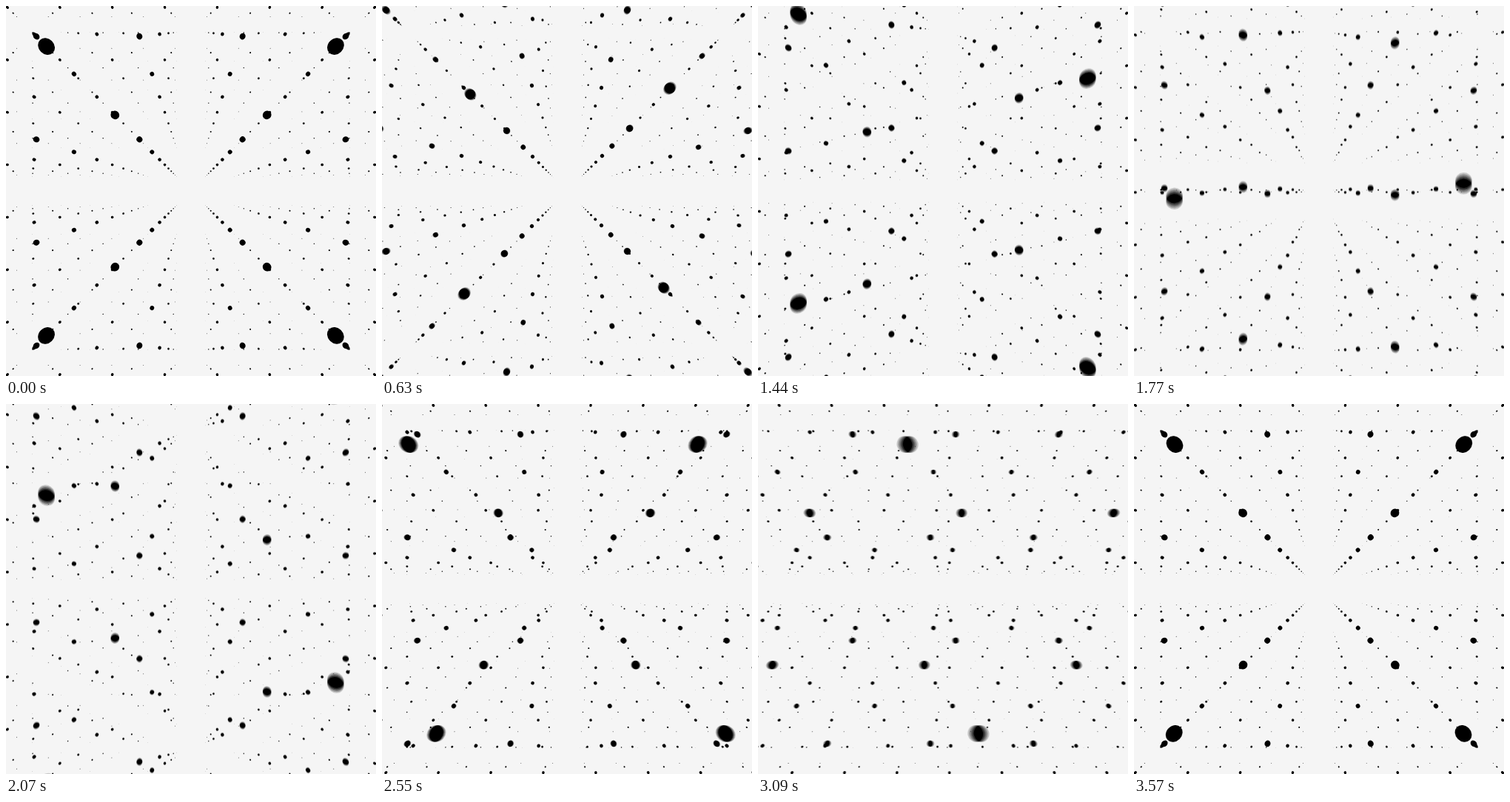
Recreate the animation shown at these times as an HTML page with a canvas. Size 500 px wide and 500 px high, loop 3600 ms.

```html
<!DOCTYPE html>
<html lang="en">
<head>
<meta charset="utf-8">
<title>Shifting lattice</title>
<style>
  html, body { margin: 0; width: 100%; height: 100%; overflow: hidden; background: #f5f5f5; }
  canvas { display: block; width: 500px; height: 500px; }
</style>
</head>
<body>
<canvas id="view" width="500" height="500"></canvas>
<script>
const SIZE = 500, MID = SIZE / 2;
const FOCAL = MID / Math.tan(Math.PI / 6);
const LOOP = 3600, STEP = 30, FRAMES = LOOP / STEP;
const NEAR = 0.108, LAYERS = 12, PEAK = 3.1, FADE = 9;
const DOT = 12.2;
const SAMPLES = 6, SHUTTER = 0.6;

const view = document.getElementById('view').getContext('2d');
const buffer = document.createElement('canvas');
buffer.width = buffer.height = SIZE;
const pen = buffer.getContext('2d');

const ease = t => t * t * (3 - 2 * t);
const sign = n => (n % 2 === 0 ? 1 : -1);

function dot(x, y, z) {
  const fade = Math.cos((z - PEAK) / FADE * Math.PI / 2);
  if (z < 0.2 || fade <= 0) return;
  const px = x / z, py = y / z;
  const cx = MID + FOCAL * px, cy = MID + FOCAL * py;
  if (cx < -20 || cx > SIZE + 20 || cy < -20 || cy > SIZE + 20) return;
  const r = DOT * fade / z;
  // a sphere in perspective stretches away from the centre
  const long = r * Math.sqrt(1 + px * px + py * py);
  const turn = Math.atan2(py, px);
  pen.moveTo(cx + long * Math.cos(turn), cy + long * Math.sin(turn));
  pen.ellipse(cx, cy, long, r, turn, 0, Math.PI * 2);
}

// Each third of the loop slides neighbouring rows one cell in opposite directions: depth, vertical, horizontal.
function lattice(phase) {
  const part = Math.floor(phase * 3) % 3;
  const e = ease(phase * 3 % 1);
  pen.fillStyle = '#f5f5f5';
  pen.fillRect(0, 0, SIZE, SIZE);
  pen.fillStyle = '#000';
  pen.beginPath();
  for (let k = 0; k <= LAYERS; k++) {
    const reach = Math.ceil((k + 1) * 0.6) + 2;
    for (let i = -reach; i < reach; i++) {
      for (let j = -reach; j < reach; j++) {
        let x = i + 0.5, y = j + 0.5, z = k + NEAR;
        if (part === 0) z += sign(i + j) * e;
        else if (part === 1) y -= sign(i + k) * e;
        else x -= sign(j + k) * e;
        dot(x, y, z);
      }
    }
  }
  pen.fill();
}

function draw(frame) {
  for (let s = 0; s < SAMPLES; s++) {
    lattice((frame + SHUTTER * s / (SAMPLES - 1)) / FRAMES);
    view.globalAlpha = 1 / (s + 1);
    view.drawImage(buffer, 0, 0);
  }
}

const start = performance.now();
let shown = 0;
draw(0);

function tick() {
  const frame = Math.floor((performance.now() - start) % LOOP / STEP);
  if (frame !== shown) draw(shown = frame);
  requestAnimationFrame(tick);
}
requestAnimationFrame(tick);
</script>
</body>
</html>
```
